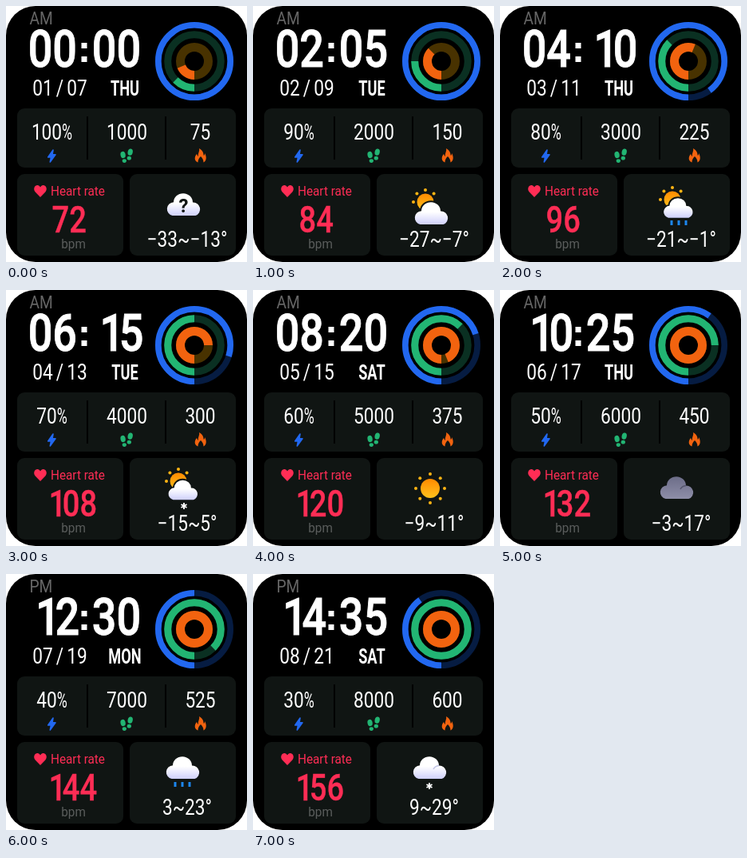
Recreate the animation shown at these times as an HTML page. Size 302 px wide and 320 px high, loop 8000 ms.

```html
<!DOCTYPE html>
<html lang="en">
<head>
<meta charset="utf-8">
<title>Watch face</title>
<style>
  html, body { margin: 0; width: 100%; height: 100%; overflow: hidden; background: #fff; }
  svg { display: block; width: 302px; height: 320px; }
  text { font-family: Roboto, "Open Sans", sans-serif; }
</style>
</head>
<body>
<svg id="face" viewBox="0 0 302 320" xmlns="http://www.w3.org/2000/svg">
  <defs>
    <linearGradient id="white" gradientUnits="userSpaceOnUse" x1="0" y1="4" x2="0" y2="28">
      <stop offset=".35" stop-color="#fff"/><stop offset="1" stop-color="#cfd0fb"/>
    </linearGradient>
    <linearGradient id="gray" gradientUnits="userSpaceOnUse" x1="0" y1="0" x2="0" y2="28">
      <stop offset="0" stop-color="#6c6d88"/><stop offset="1" stop-color="#8e8ea8"/>
    </linearGradient>
    <linearGradient id="sunFill" x1="0" y1="0" x2="0" y2="1">
      <stop offset="0" stop-color="#ff8a00"/><stop offset="1" stop-color="#ffc21c"/>
    </linearGradient>
  </defs>

  <rect width="302" height="320" rx="37" fill="#000"/>
  <g fill="#101513">
    <rect x="14" y="128" width="274" height="74" rx="9"/>
    <rect x="14" y="210" width="133" height="102" rx="9"/>
    <rect x="155" y="210" width="133" height="102" rx="9"/>
  </g>
  <path d="M102 138V192M200 138V192" stroke="#000" stroke-width="2"/>
  <path d="M94.5 46h7v7h-7zM94.5 63h7v7h-7z" fill="#fff"/>

  <path d="M59 180L52.7 189H56.5L55.3 195L62 185.8H58Z" fill="#2268f0" stroke="#2268f0" stroke-width="1.6" stroke-linejoin="round"/>
  <g fill="#22b573">
    <ellipse cx="146.6" cy="186" rx="3.1" ry="4.2" transform="rotate(-12 146.6 186)"/>
    <ellipse cx="148.3" cy="193.6" rx="2.6" ry="2.4"/>
    <ellipse cx="155.7" cy="182.6" rx="3.1" ry="4.2" transform="rotate(12 155.7 182.6)"/>
    <ellipse cx="154.3" cy="190.2" rx="2.6" ry="2.4"/>
  </g>
  <path d="M242 178C248 181 247 185 248 187C249 186 249 185 249 184C252 189 251 194 247.5 195.5C247.5 192 246 190 244 188C242 190 240.5 192 240.5 195.5C236 194 235.500 189 239 185C240 187 240 187 241 188C240 184 243 182 242 178Z" fill="#f2630f"/>
  <path d="M43 239L36.7 232.5C33 228 37 223 40.5 224.3Q42 224.8 43 226.5Q44 224.8 45.5 224.3C49 223 53 228 49.3 232.5Z" fill="#ff2d55"/>

  <g id="rings" transform="rotate(90 236 69)" fill="none"></g>
  <g id="labels"></g>
  <g id="weather"></g>
</svg>
<script>
const get = id => document.getElementById(id);
const NS = "http://www.w3.org/2000/svg";
const two = n => String(n).padStart(2, "0");

function add(parent, tag, attrs) {
  const el = document.createElementNS(NS, tag);
  for (const key in attrs) el.setAttribute(key, attrs[key]);
  return parent.appendChild(el);
}

const place = (x, y, sx) => `translate(${x} ${y}) scale(${sx} 1)`;

// Condensed lettering: sx is the width factor of the style.
function label(x, y, size, sx, opt = {}) {
  const fill = opt.fill || "#fff";
  return add(get("labels"), "text", {
    transform: place(x, y, sx),
    "font-size": size,
    "font-weight": opt.weight || 400,
    "text-anchor": opt.anchor || "middle",
    fill, stroke: fill, "stroke-width": opt.line || 0
  });
}

// In the large numerals a "1" stands at the right of its cell.
function setNumeral(el, text) {
  const step = .12 * el.getAttribute("font-size");
  const one = c => c === "1" ? step : 0;
  el.textContent = text;
  el.setAttribute("dx", [...text].map((c, i) => one(c) - one(text[i - 1])).join(" "));
}

function ring(r, width, color, track) {
  const base = { cx: 236, cy: 69, r, "stroke-width": width, pathLength: 1 };
  add(get("rings"), "circle", { ...base, stroke: track });
  const arc = add(get("rings"), "circle", { ...base, stroke: color });
  return part => arc.setAttribute("stroke-dasharray", `${Math.min(1, part)} 1`);
}

const red = "#ff2d55", dim = "#5a5d5c", value = [27, .84];
const big = { weight: 500, line: 1 };
const ui = {
  half: label(29.5, 23, 22, .87, { anchor: "start", fill: "#666" }),
  month: label(46, 112, ...value),
  slash: label(67.5, 112, ...value),
  day: label(89, 112, ...value),
  week: label(149, 111.7, 26, .7, { weight: 700 }),
  charge: label(0, 167, ...value),
  percent: label(0, 167, 27, .66),
  steps: label(151.5, 167, ...value),
  burn: label(243.5, 167, ...value),
  title: label(56, 237, 17, .9, { anchor: "start", fill: red }),
  unit: label(84.5, 303, 17, .9, { fill: dim }),
  temp: label(227, 300.8, ...value)
};
const numerals = {
  hour: label(58.3, 76, 65, .83, big),
  minute: label(138.5, 76, 65, .83, big),
  pulse: label(79.3, 282.6, 46.5, .82, { weight: 500, line: .4, fill: red })
};
ui.slash.textContent = "/";
ui.percent.textContent = "%";
ui.title.textContent = "Heart rate";
ui.unit.textContent = "bpm";

const chargeRing = ring(45.2, 7.6, "#2268f0", "#061c42");
const stepRing = ring(33.3, 9, "#22b573", "#0a3022");
const burnRing = ring(17.5, 11, "#f2630f", "#483200");

const CLOUD = "M8.500 28A8.500 8.500 0 0 1 10 11.200A12 11.200 0 0 1 34 11.500A8.500 8.500 0 0 1 37.500 28Z";
// rim is a gap in the card colour that parts the cloud from the sun.
const cloud = (x, y, { s = 1, fill = "white", fold, rim = 0 } = {}) =>
  `<g transform="translate(${x} ${y}) scale(${s})">` +
  `<path d="${CLOUD}" stroke="#101513" stroke-width="${rim}"/><path d="${CLOUD}" fill="url(#${fill})"/>` +
  (fold ? `<path d="M34 11.500Q29 12 27 16" fill="none" stroke="${fold}" stroke-width="1.6"/>` : "") + "</g>";

// Rays are dots around the disc, from angle a to b in degrees.
function sun(x, y, r, far, a, b) {
  let out = `<circle cx="${x}" cy="${y}" r="${r}" fill="url(#sunFill)"/>`;
  for (let d = a; d <= b; d += 45) {
    const t = d * Math.PI / 180;
    out += `<circle cx="${x + far * Math.cos(t)}" cy="${y + far * Math.sin(t)}" r="2" fill="#ffb414"/>`;
  }
  return out;
}

const rain = (x, y) => `<path d="M${x - 9} ${y}v6M${x} ${y}v6M${x + 9} ${y}v6" stroke="#1c86ee" stroke-width="3"/>`;
const snow = (x, y) => `<path d="M${x} ${y - 4}v8M${x - 3.5} ${y - 2}l7 4M${x - 3.5} ${y + 2}l7 -4" stroke="#fff" stroke-width="1.9"/>`;
const smallSun = (x, y) => sun(x, y, 10.5, 15, 180, 315);

const skies = [
  cloud(200, 234) + `<text x="222.5" y="258" font-size="24" font-weight="700" text-anchor="middle" fill="#101513">?</text>`,
  smallSun(216, 245) + cloud(201, 245, { rim: 4 }),
  smallSun(216, 242) + cloud(203.5, 240, { s: .88, rim: 4 }) + rain(224, 268),
  smallSun(216, 239) + cloud(202, 237.5, { s: .88, rim: 4 }) + snow(223, 270),
  sun(222, 248, 12, 18, 0, 315),
  cloud(199, 233, { fill: "gray", fold: "#55566e" }),
  cloud(199, 228) + rain(221, 260),
  cloud(199, 228, { fold: "#c3c5e6" }) + snow(221, 265)
];
const weekdays = ["THU", "TUE", "THU", "TUE", "SAT", "THU", "MON", "SAT"];
const signed = n => String(n).replace("-", "\u2212");

function show(i) {
  const charge = 100 - 10 * i, steps = 1000 * (i + 1), burn = 75 * (i + 1);
  const text = {
    half: i < 6 ? "AM" : "PM",
    month: two(i + 1),
    day: two(7 + 2 * i),
    week: weekdays[i],
    charge, steps, burn,
    temp: `${signed(6 * i - 33)}~${signed(6 * i - 13)}\u00b0`
  };
  for (const key in text) ui[key].textContent = text[key];
  setNumeral(numerals.hour, two(2 * i));
  setNumeral(numerals.minute, two(5 * i));
  setNumeral(numerals.pulse, String(72 + 12 * i));

  const digits = 12.7 * String(charge).length;
  ui.charge.setAttribute("transform", place(51, 167, .84));
  ui.percent.setAttribute("transform", place(57.5 + digits / 2, 167, .66));

  chargeRing((charge + 10) / 100);
  stepRing(steps / 8000);
  burnRing(burn / 400);
  get("weather").innerHTML = skies[i];
}

let shown = -1;
const start = performance.now();
function tick() {
  const i = Math.floor((performance.now() - start) / 1000) % 8;
  if (i !== shown) show(shown = i);
  requestAnimationFrame(tick);
}
tick();
</script>
</body>
</html>
```
